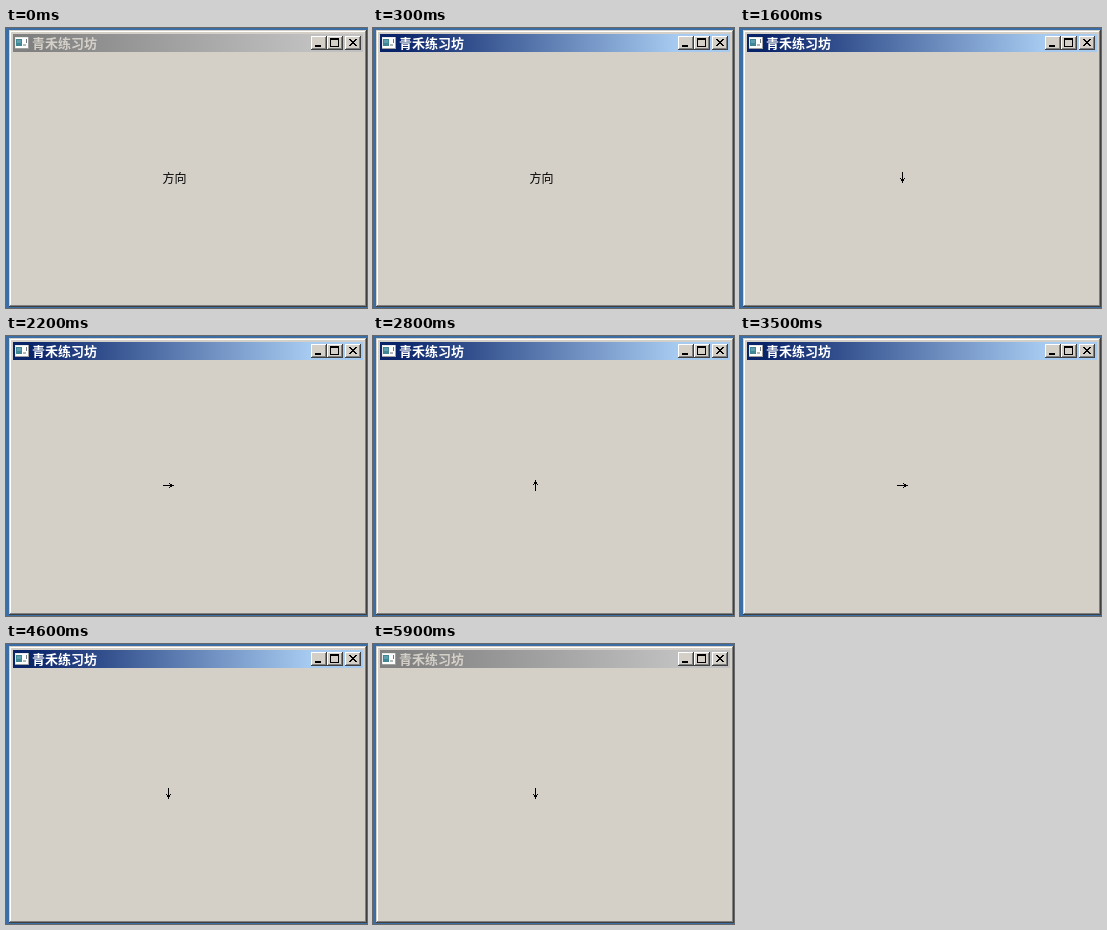
An HTML page with a canvas that plays this animation: 361 px wide and 280 px high, repeating every 6000 ms.

```html
<!DOCTYPE html>
<html lang="zh-CN">
<head>
<meta charset="utf-8">
<style>
  html, body { margin: 0; width: 100%; height: 100%; overflow: hidden; background: #3a6ea5; }
  canvas { display: block; }
</style>
</head>
<body>
<canvas id="stage" width="361" height="280"></canvas>
<script>
const ctx = document.getElementById('stage').getContext('2d');
const LOOP = 6000;
const FACE = '#d4d0c8', LIGHT = '#fff', SHADOW = '#808080', DARK = '#404040';
const FONT = '"Noto Sans CJK SC", "Noto Sans CJK", sans-serif';

// Label state from each start time on
const states = [
  [0, 'label'], [1200, 'up'], [1600, 'down'], [2000, 'left'], [2200, 'right'],
  [2800, 'up'], [3200, 'down'], [3500, 'right'], [4000, 'left'],
  [4400, 'up'], [4600, 'down']
];

function box(x, y, w, h, color) {
  ctx.fillStyle = color;
  ctx.fillRect(x, y, w, h);
}

// Two-tone edge, one pixel wide
function edge(x, y, w, h, topLeft, bottomRight) {
  box(x, y, w, 1, topLeft);
  box(x, y, 1, h, topLeft);
  box(x, y + h - 1, w, 1, bottomRight);
  box(x + w - 1, y, 1, h, bottomRight);
}

function text(str, x, y, font, color) {
  ctx.font = font + ' ' + FONT;
  ctx.textBaseline = 'alphabetic';
  ctx.fillStyle = color;
  ctx.fillText(str, x, y);
}

function button(x, y) {
  box(x, y, 16, 14, FACE);
  edge(x, y, 16, 14, LIGHT, DARK);
  edge(x + 1, y + 1, 14, 12, FACE, SHADOW);
}

function drawButtons() {
  button(305, 8);
  box(309, 17, 6, 2, '#000');

  button(321, 8);
  edge(324, 10, 9, 9, '#000', '#000');
  box(324, 11, 9, 1, '#000');

  button(339, 8);
  for (let i = 0; i < 7; i++) {
    box(343 + i, 11 + i, 2, 1, '#000');
    box(349 - i, 11 + i, 2, 1, '#000');
  }
}

function drawIcon() {
  box(9, 9, 14, 12, LIGHT);
  edge(9, 9, 14, 12, '#e8e8e8', '#a0a0a0');
  box(10, 11, 6, 7, '#3f8794');
  box(11, 12, 4, 3, '#5f9fb0');
  box(17, 16, 3, 2, '#b8b8b8');
  box(20, 11, 1, 4, '#707880');
}

function drawWindow(active) {
  box(0, 0, 361, 280, '#3a6ea5');
  box(3, 2, 358, 277, FACE);
  edge(3, 2, 358, 277, FACE, DARK);
  edge(4, 3, 356, 275, LIGHT, SHADOW);

  const bar = ctx.createLinearGradient(25, 0, 303, 0);
  bar.addColorStop(0, active ? '#0a246a' : '#808080');
  bar.addColorStop(1, active ? '#a6caf0' : '#c0c0c0');
  box(7, 6, 350, 18, bar);
  drawIcon();
  text('青禾练习坊', 26, 20, 'bold 13px', active ? '#fff' : FACE);
  drawButtons();
}

function drawArrow(dir) {
  const vertical = dir === 'up' || dir === 'down';
  const sign = dir === 'up' || dir === 'left' ? -1 : 1;
  const dot = (along, across) => vertical
    ? box(162 + across, 149 + along * sign, 1, 1, '#000')
    : box(162 + along * sign, 149 + across, 1, 1, '#000');

  for (let i = -5; i <= 5; i++) dot(i, 0);
  for (const side of [-1, 1]) {
    dot(3, side);
    dot(2, side);
    dot(1, side * 2);
  }
}

function draw(t) {
  drawWindow(t >= 300 && t < 5900);
  const state = states.filter(s => s[0] <= t).pop()[1];
  if (state === 'label') text('方向', 156.5, 154.5, '12px', '#000');
  else drawArrow(state);
}

const start = performance.now();
function tick() {
  draw((performance.now() - start) % LOOP);
  requestAnimationFrame(tick);
}
tick();
</script>
</body>
</html>
```
